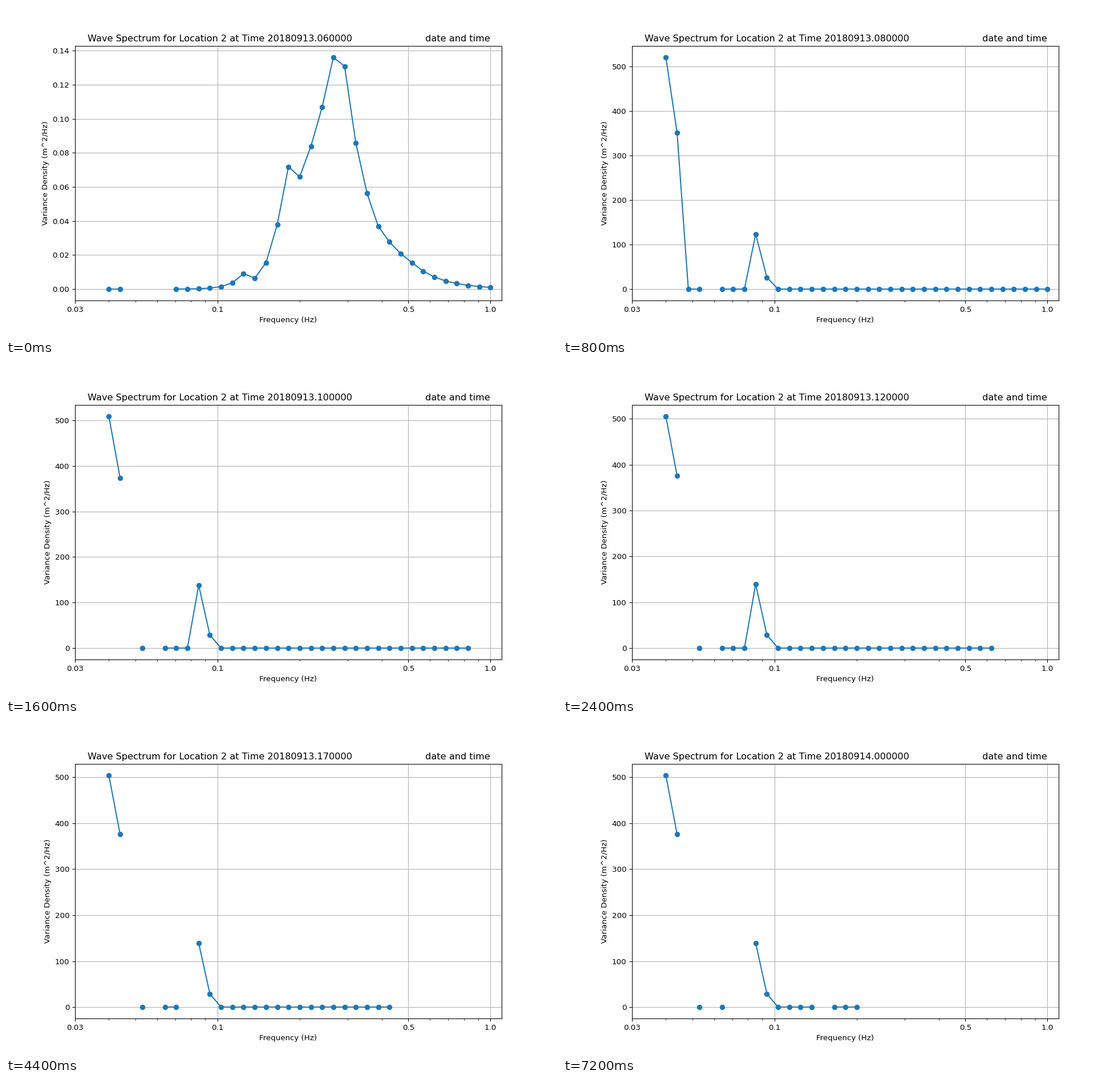
These frames come from a looping animation (966x580 px, 7.6 s). A matplotlib script:

```python
import numpy as np
import matplotlib.pyplot as plt
from matplotlib.animation import FuncAnimation
from matplotlib.ticker import NullFormatter

DPI = 96.6
WIDTH, HEIGHT = 966, 580
FRAMES = 19
FIRST_HOUR = 6

bins = np.arange(35)
freqs = np.geomspace(0.04, 1.0, bins.size)

# Turning points of the first spectrum (bin, density), joined exponentially.
OPENING = [(7, 1e-4), (12, 0.0091), (13, 0.0064), (15, 0.0379), (16, 0.0719),
           (17, 0.0659), (20, 0.1361), (21, 0.1309), (22, 0.0859),
           (24, 0.0369), (27, 0.0156), (34, 0.001)]

# Bin: (start, settled value, share of the difference kept each hour)
SETTLING = {0: (535.6, 504.1, 0.53), 1: (293.5, 376.0, 0.30),
            8: (83.0, 139.4, 0.28), 9: (20.4, 28.8, 0.30)}

# Bin: step at which its value drops out
DROPOUTS = {4: 1, 2: 3, 7: 11, 6: 15, 14: 17}


def opening_spectrum():
    key_bins, densities = zip(*OPENING)
    values = np.exp(np.interp(bins, key_bins, np.log(densities)))
    values[:7] = 0
    values[2:6] = np.nan
    return values


def last_bin(step):
    """The high end is eaten away by about one bin an hour."""
    return np.interp(step, [3, 5, 9, 10, 16, 17], [34, 30, 26, 26, 20, 17])


def spectrum(step):
    if step == 0:
        return opening_spectrum()
    values = np.zeros(bins.size)
    for i, (start, settled, keep) in SETTLING.items():
        values[i] = settled + (start - settled) * keep ** (step - 1)
    values[bins > last_bin(step)] = np.nan
    for i, lost in DROPOUTS.items():
        if step >= lost:
            values[i] = np.nan
    return values


def title_text(step):
    days, hour = divmod(FIRST_HOUR + step, 24)
    stamp = f"201809{13 + days}.{hour:02d}0000"
    return f"Wave Spectrum for Location 2 at Time {stamp}" + " " * 25 + "date and time"


# The small surplus keeps the pixel size from rounding down.
fig, ax = plt.subplots(figsize=((WIDTH + 0.01) / DPI, (HEIGHT + 0.01) / DPI), dpi=DPI)
fig.subplots_adjust(left=0.1248, right=0.8998, bottom=0.1097, top=0.8797)
line, = ax.plot(freqs, spectrum(0), marker="o")
ax.set_xscale("log")
ax.set_xlim(0.03, 1.1)
ax.set_xticks([0.03, 0.1, 0.5, 1.0], ["0.03", "0.1", "0.5", "1.0"])
ax.xaxis.set_minor_formatter(NullFormatter())
ax.set_xlabel("Frequency (Hz)")
ax.set_ylabel("Variance Density (m^2/Hz)")
ax.grid(True)
title = ax.set_title("", x=0.5015)


def draw(step):
    values = spectrum(step)
    peak = np.nanmax(values)
    line.set_ydata(values)
    ax.set_ylim(-0.05 * peak, 1.05 * peak)
    title.set_text(title_text(step))
    return line, title


anim = FuncAnimation(fig, draw, frames=FRAMES, interval=400, repeat=True,
                     repeat_delay=0, blit=False)
plt.show()
```
